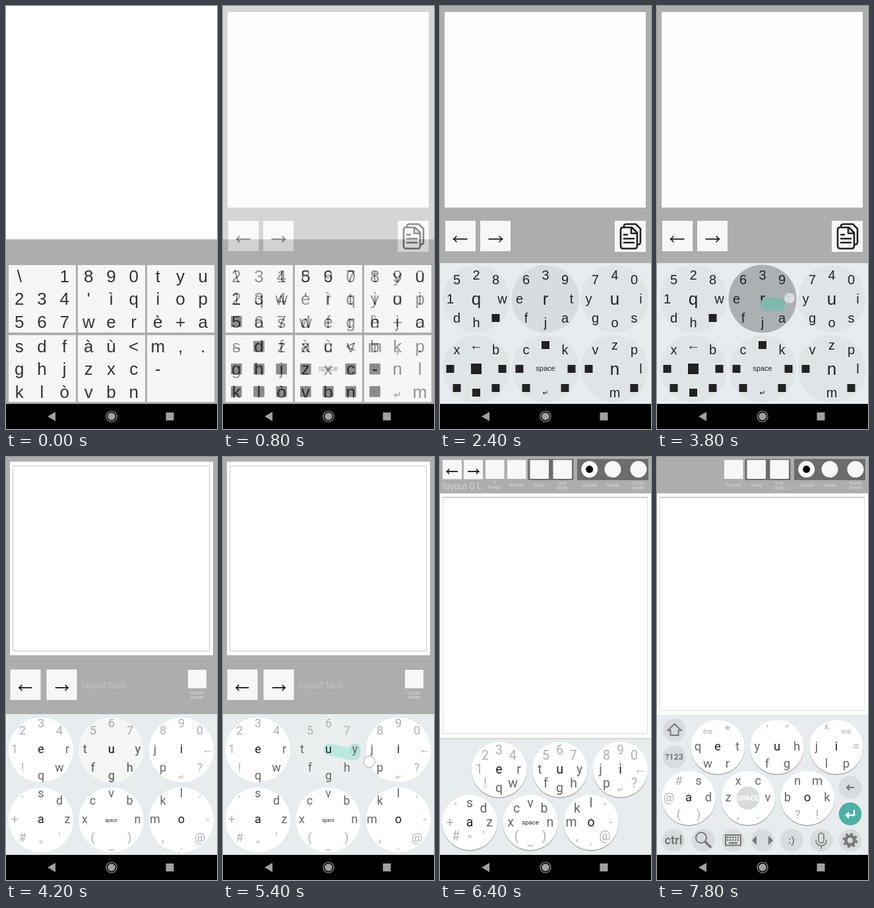
An HTML page that plays this animation: 320x640 px, repeating every 8000 ms.

```html
<!DOCTYPE html>
<html lang="en">
<head>
<meta charset="utf-8">
<style>
html, body { margin: 0; width: 100%; height: 100%; overflow: hidden; background: #fff; }
svg { display: block; width: 320px; height: 640px; }
text { font-family: "Liberation Sans", Arial, sans-serif; text-anchor: middle; }
.ui, .keys text { font-family: Roboto, sans-serif; }
.ui { font-weight: 300; }
</style>
</head>
<body>
<svg id="stage" viewBox="0 0 320 640"></svg>
<script>
const STEP = 200, LOOP = 8000;
const GRAY = '#adadad', PAD = '#e7ecef', TEAL = '#7fb8b0';
const stage = document.getElementById('stage');

const rect = (x, y, w, h, fill, more = '') =>
  `<rect x="${x}" y="${y}" width="${w}" height="${h}" fill="${fill}" ${more}/>`;
const disc = (x, y, r, fill, more = '') =>
  `<circle cx="${x}" cy="${y}" r="${r}" fill="${fill}" ${more}/>`;
const line = (d, color, w, more = '') =>
  `<path d="${d}" fill="none" stroke="${color}" stroke-width="${w}" ${more}/>`;
const shape = (d, fill) => `<path d="${d}" fill="${fill}"/>`;
const text = (s, x, y, size, fill, more = '') =>
  `<text x="${x}" y="${y}" font-size="${size}" fill="${fill}" ${more}>${s}</text>`;
const group = (id, body) => `<g id="${id}">${body}</g>`;

// Glyph on a point, its baseline `drop` below; solid squares stand for unassigned keys.
function glyph(s, x, y, size, fill, block, drop = size * .35) {
  if (s === '~') return '';
  if (s === '■') return rect(x - block / 2, y - block / 2, block, block, '#222');
  if (s === 'space') return text(s, x, y + 3, size, fill);
  return text(s, x, y + drop, size, fill);
}

function arrow(x, y, dir, r) {
  const tip = x + dir * r, back = tip - dir * r * .45, h = r * .45;
  return line(`M${x - dir * r} ${y}H${tip}M${back} ${y - h}Q${tip - dir * 2} ${y - 1} ${tip} ${y}Q${tip - dir * 2} ${y + 1} ${back} ${y + h}`, '#111', 1.6);
}

const button = (x, y, w, h = w) => rect(x, y, w, h, '#f7f7f7');

function arrows(x1, x2, y, w, r) {
  return button(x1, y, w) + button(x2, y, w) +
    arrow(x1 + w / 2, y + w * .6, -1, r) + arrow(x2 + w / 2, y + w * .6, 1, r);
}

const copyIcon = button(265, 325, 47) +
  line('M279 334V332Q280 330 283 330H297L304 337V357Q304 361 300 361', '#222', 2.6) +
  line('M277 335H291L299 343V363Q299 367 295 367H278Q274 367 274 363V339Q274 335 277 335ZM290 335V344H299', '#222', 2.6, 'stroke-linejoin="round"') +
  line('M279 346H284M279 352H294M279 358H294', '#222', 2.6, 'stroke-linecap="round"');

function grid(cells) {
  return cells.map((cell, i) => {
    const x = 4 + i % 3 * 105, y = i < 3 ? 392 : 498;
    return rect(x, y, 102, i < 3 ? 102 : 101, '#f6f6f6') + cell.split(' ').map((s, k) => {
      const size = s === 'space' ? 11 : s === '↵' ? 14 : s === '←' ? 20 : 26;
      return glyph(s, x + 16.3 + k % 3 * 34.2, y + 17 + (k / 3 | 0) * 34.2 + (s === '↵' ? 5 : 0), size, '#333', 16.5);
    }).join('');
  }).join('');
}

// Nine labels around a round key: corner offsets (dx, dy), side offsets (sx, sy).
function ring(keys, cx, cy, o) {
  const xs = [-o.dx, 0, o.dx, -o.sx, 0, o.sx, -o.dx, 0, o.dx];
  const ys = [-o.dy, -o.sy, -o.dy, 0, 0, 0, o.dy, o.sy, o.dy];
  const shadow = o.shadow ? disc(cx, cy + 1, o.r, '#888') : '';
  return shadow + disc(cx, cy, o.r, o.fill) + keys.split(' ').map((s, k) => {
    const mid = k === 4, word = s.length > 1 && s[0] !== '&';
    const fill = o.ink || (mid ? '#222' : /^[a-z]$/.test(s) ? '#666' : '#b0b0b0');
    if (s === 'SPACE')
      return disc(cx, cy, 17.5, '#d8dbdc') + text(s, cx, cy + 4, 11, '#fff', 'font-weight="bold"');
    const size = s === 'space' ? o.space : word || s === '↵' ? 11 : mid ? o.mid : o.size;
    return glyph(s, cx + xs[k], cy + ys[k], size, fill, mid ? 16 : 12, o.drop);
  }).join('');
}

const rings = (sets, centers, o) =>
  sets.map((keys, i) => ring(keys, ...centers[i], o)).join('');
const pairRows = (x1, x2, gap, y1, y2) =>
  [0, 1, 2, 3, 4, 5].map(i => i < 3 ? [x1 + i * gap, y1] : [x2 + (i - 3) * gap, y2]);

const label = (s, x, y) => s.split(' ').map((w, i, a) =>
  text(w, x, y + (i - (a.length - 1) / 2) * 7, 6.3, '#eee', 'class="ui"')).join('');

function header(full) {
  let s = rect(0, 0, 320, 55, GRAY) + rect(133.5, 3, 69, 32, '#6c6c6c') + rect(208, 3, 108, 32, '#6c6c6c');
  if (full) s += arrows(4, 36, 4.5, 29, 8.4) + button(69, 4.5, 28.5) + label('E Margin', 83, 44) +
    text('layout 0 L', 4, 49, 14, '#e6e6e6', 'class="ui" style="text-anchor:start"');
  [[102, 'Reverse'], [136.5, 'Sticky'], [171.5, 'Very Sticky']].forEach(([x, name]) =>
    s += button(x, 4.5, 28.5) + label(name, x + 14, 45));
  [[226.7, 'Joystick'], [262, 'Needle'], [301, 'Double Needle']].forEach(([x, name]) =>
    s += disc(x, 18.6, 12.5, '#f8f8f8') + label(name, x, 45));
  return s + disc(226.7, 18.6, 5.5, '#000');
}

const sheet = (h, top) => rect(0, 55, 320, 560, '#fdfdfd') +
  rect(4.5, 61.5, 310, h, '#fff', 'stroke="#ddd"') + line('M4 61H315', '#aaa', 1) + rect(0, top, 320, 602 - top, PAD);

const first = rect(0, 0, 320, 353, '#fff') + rect(0, 353, 320, 249, GRAY) + grid([
  '\\ ~ 1 2 3 4 5 6 7', "8 9 0 ' ì q w e r", 't y u i o p è + a',
  's d f g h j k l ò', 'à ù &lt; z x c v b n', 'm , . - ~ ~ ~ ~ ~']);

const top2 = rect(0, 0, 320, 602, GRAY) + rect(7, 9, 305, 296, '#fdfdfd') + arrows(8, 61, 325, 46, 10.5) + copyIcon;

const second = top2 + grid([
  '2 3 4 1 q w ■ a s', '5 6 7 e r t d f g', '8 9 0 y u i h j o',
  '← ■ z ■ ■ ■ ■ ■ ■', 'x c v ■ space ■ ■ ■ ■', 'b k p ■ n l ■ ↵ m']);

const soft = { r: 51, dx: 29.5, dy: 29, sx: 39.5, sy: 36, size: 20, mid: 26, space: 11, fill: '#dfe4e7', ink: '#222' };
const third = top2 + rect(0, 389, 320, 213, PAD) + rings([
  '5 2 8 1 q w d h ■', '~ ~ ~ ~ ~ ~ ~ ~ ~', '7 4 0 y u i g o s',
  'x ← b ■ ■ ■ ■ ■ ■', 'c ■ k ■ space ■ ■ ↵ ■', 'v z p ■ n l ~ m ■'],
  pairRows(55, 55, 105, 443, 549), soft) +
  disc(160, 443, 51.5, '#a6abac', 'id="press"') +
  ring('6 3 9 e r t f j a', 160, 443, { ...soft, fill: 'none' }) +
  line('', TEAL, 21, 'id="swipeA" stroke-linecap="round" opacity=".92"') +
  disc(0, 0, 8, '#e2e5e6', 'id="dotA" stroke="#bbb" fill-opacity=".9"');

const letters = ['2 3 4 1 e r ! q w', '5 6 7 t u y f g h', '8 9 0 j i ← p ↵ ?',
  "` s d + a z # &quot; '", 'c v b x space n ( _ )', 'k l ´ m o - , . @'];
const light = { r: 49, dx: 28, dy: 28, sx: 40, sy: 39.5, size: 18, mid: 18, space: 7, drop: 5, fill: '#fff' };
const fourth = rect(0, 0, 320, 602, GRAY) + rect(6, 7, 308, 293, '#fff') +
  rect(10.5, 13.5, 298, 280, '#fff', 'stroke="#ccc"') + arrows(6.5, 61.5, 321.5, 46, 9.7) +
  text('layout tasti', 115, 350, 14, '#c9c9c9', 'class="ui" style="text-anchor:start"') +
  button(276, 322, 28) + label('Double Needle', 290, 362.5) + rect(0, 389, 320, 213, PAD) +
  rings(letters, pairRows(53, 53, 106.5, 443, 549), light) +
  disc(160, 443, 49.5, '#ebeeee', 'id="pressB"') +
  line('', '#bce8e2', 18, 'id="swipeB" stroke-linecap="round"') +
  disc(200, 442.5, 9, '#b0e0da', 'id="hit"') +
  ring(letters[1], 160, 443, { ...light, fill: 'none' }) +
  disc(0, 0, 8.5, '#fff', 'id="dotB" stroke="#aaa" fill-opacity=".8"');

const fifth = header(true) + sheet(357, 426) + line('M0 426H320', '#bbb', 1) +
  rings(letters, pairRows(89.5, 45, 92, 473, 553),
    { r: 42, dx: 21, dy: 21, sx: 30, sy: 28.5, size: 19.5, mid: 19.5, space: 9.5, drop: 5.5, fill: '#fff', shadow: true });

const ICON = '#787878', SPOT = '#d8dcde';
function tools() {
  const spots = [[26, 413], [26, 454], [293, 500], ...[25, 70, 115, 160, 204, 249, 293].map(x => [x, 580])];
  const bold = (s, x, y, size) => text(s, x, y, size, ICON, 'font-weight="bold"');
  let s = spots.map(([x, y]) => disc(x, y, 17.3, SPOT)).join('') + disc(293, 540, 17.3, '#4fb0a5');
  s += line('M16.5 413.5L26.5 404L36.5 413.5H32.5V421H20.5V413.5Z', ICON, 2);
  s += bold('?123', 26, 458, 12.5) + bold('ctrl', 25, 585.5, 18) + bold(':)', 204, 585, 15);
  s += line('M299 500H288M292 496L288 500L292 504', ICON, 2.2);
  s += line('M299 534V542H287M291 538L287 542L291 546', '#fff', 2.5);
  s += disc(67, 576, 8, 'none', `stroke="${ICON}" stroke-width="2"`) + line('M73 582L82 591', ICON, 3.5);
  s += rect(104, 572, 23, 15.5, 'none', `stroke="${ICON}" stroke-width="2"`) +
    line('M106 575.5H126M106 579.5H126', ICON, 2.4, 'stroke-dasharray="2.4 1.6"') + line('M109 584H122', ICON, 2.4);
  s += shape('M151 573V587L144 580ZM169 573V587L176 580Z', ICON);
  s += rect(245, 569, 8, 15, 'none', `rx="4" stroke="${ICON}" stroke-width="1.6"`) +
    line('M241 579Q241 588 249 588Q257 588 257 579M249 588V593', ICON, 1.6);
  s += disc(293, 580, 6.5, 'none', `stroke="${ICON}" stroke-width="4.5"`) +
    disc(293, 580, 9.8, 'none', `stroke="${ICON}" stroke-width="3" stroke-dasharray="4 3.7"`);
  return s;
}

const sixth = header(false) + sheet(322, 390) + tools() + rings([
  'èıe ~ * q e t w ~ r', "' ~ &quot; y u h f ~ g", '^ ~ eıé j i = l ~ p',
  '# ~ s @ a d ( ~ )', 'x ~ c z SPACE v , ~ .', 'n ~ m b o k ? ~ !'],
  pairRows(92, 48, 90, 439, 516),
  { r: 41, dx: 15, dy: 25.5, sx: 30, sy: 0, size: 18.5, mid: 18.5, drop: 5.2, fill: '#fff', shadow: true });

const nav = rect(0, 602, 320, 38, '#000') + shape('M75 614V628L63 621Z', '#a0a0a0') +
  disc(160, 621, 8, 'none', 'stroke="#a0a0a0" stroke-width="1.2"') + disc(160, 621, 5.8, '#a0a0a0') +
  rect(242.5, 615, 12, 12, '#a0a0a0');

const keys = body => `<g class="keys">${body}</g>`;
const scenes = [first, second, third, keys(fourth), keys(fifth), keys(sixth)];
const starts = [0, 600, 2400, 4000, 6000, 7200];
stage.innerHTML = scenes.map((s, i) => group('scene' + i, s)).join('') + nav;

const $ = id => document.getElementById(id);
const ramp = (t, a, b) => Math.min(1, Math.max(0, (t - a) / (b - a)));
const set = (id, attrs) => Object.entries(attrs).forEach(([k, v]) => $(id).setAttribute(k, v));
const shown = on => ({ visibility: on ? 'inherit' : 'hidden' });

function swipe(name, p, from, end, dot) {
  const mix = (a, b) => a + (b - a) * p;
  set('swipe' + name, { d: `M${from}L${mix(from[0], end[0])} ${mix(from[1], end[1])}`, ...shown(p > 0) });
  set('dot' + name, { cx: mix(160, dot[0]), cy: mix(443, dot[1]), ...shown(p > 0) });
}

function draw(now) {
  const t = Math.floor(now % LOOP / STEP) * STEP;
  scenes.forEach((_, i) => set('scene' + i, {
    visibility: t >= starts[i] && t < (starts[i + 1] || LOOP) || i === 0 && t < 1200 ? 'visible' : 'hidden'
  }));
  set('scene1', { opacity: ramp(t, 400, 1200) });
  set('press', { opacity: .15 + .75 * ramp(t, 2400, 3200) });
  swipe('A', ramp(t, 2800, 3800), [167, 451.5], [184, 451.5], [201, 442]);
  set('pressB', { opacity: ramp(t, 4000, 4400) });
  swipe('B', ramp(t, 4200, 5400), [161, 442.5], [199, 450.5], [222, 461]);
  set('hit', shown(t >= 5000));
  requestAnimationFrame(draw);
}
requestAnimationFrame(draw);
</script>
</body>
</html>
```
